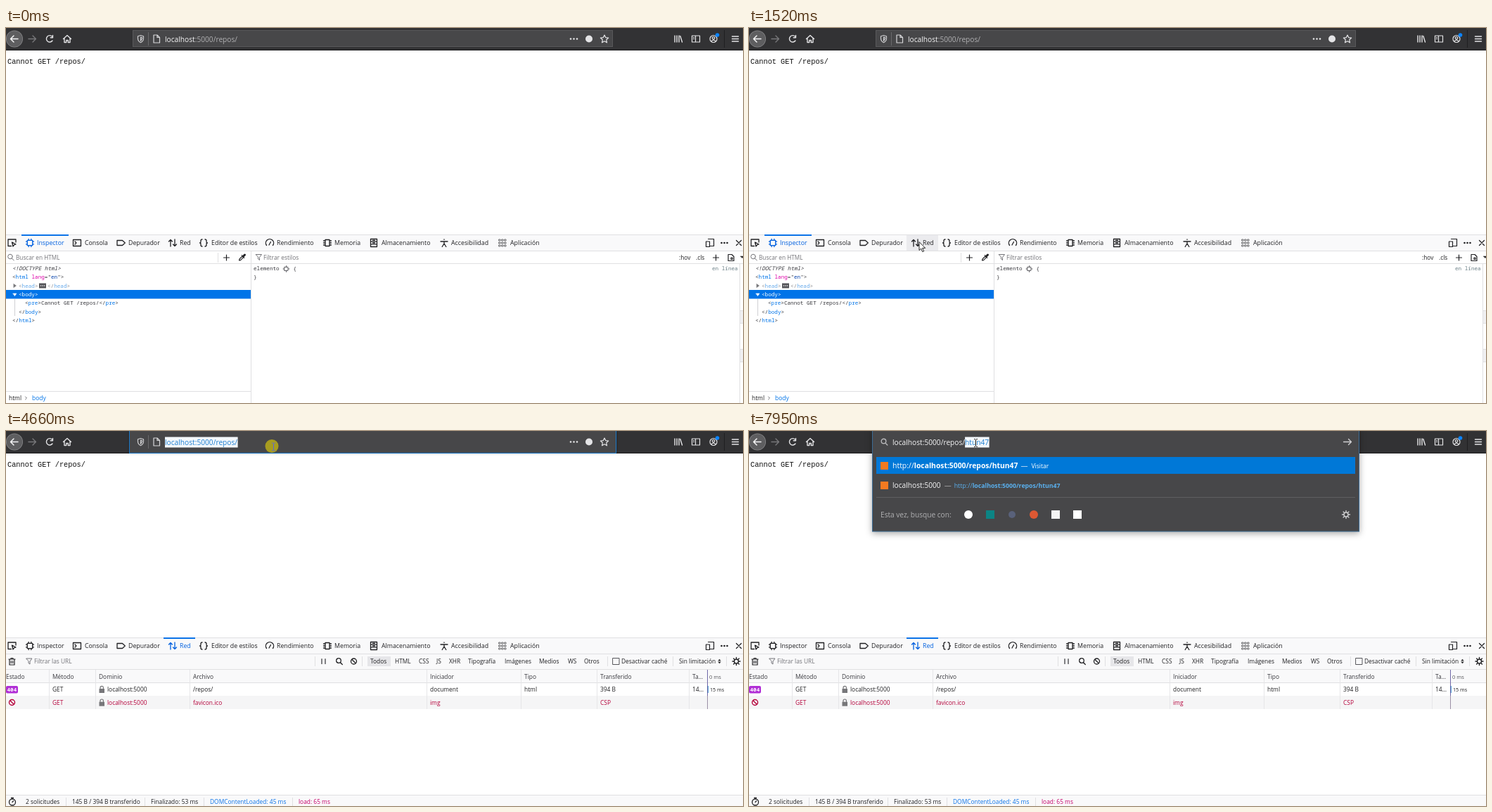
Animation, 1048 px wide and 534 px high, one loop 8000 ms. Source, as an HTML page with a canvas:

```html
<!DOCTYPE html>
<html lang="es">
<head>
<meta charset="utf-8">
<style>
html, body { margin: 0; width: 100%; height: 100%; overflow: hidden; background: #fff }
canvas { display: block }
</style>
</head>
<body>
<canvas id="stage" width="1048" height="534"></canvas>
<script>
const g = document.getElementById('stage').getContext('2d');
const LOOP = 8000, REPO = 'htun47', BASE = 'localhost:5000/repos/';
const SANS = '"Open Sans", sans-serif', MONO = '7.65px "Noto Sans Mono", monospace';
const INK = '#202023', GREY = '#737378', BLUE = '#0060df', LINE = '#e0e0e2', PALE = '#f9f9fa', RED = '#b5003a';
const LIGHT = '#e4e4e6', FIELD = '#474749';

// pointer path: time, x, y
const PATH = [[460, 405, 540], [880, 285, 375], [980, 254, 337], [1220, 247, 307], [1300, 246, 306],
  [1520, 242, 305], [2220, 242, 305], [2390, 244, 303], [2500, 247, 300], [2620, 253, 305], [2870, 251, 307],
  [2950, 240, 309], [3020, 246, 306], [3220, 246, 306], [3420, 248, 303], [3570, 248, 303], [4280, 380, 22],
  [6900, 380, 22], [7150, 343, 17], [7550, 303, 15], [7949, 303, 15], [7950, 322, 16.5]];

const rect = (x, y, w, h, c) => { g.fillStyle = c; g.fillRect(x, y, w, h); };
const disc = (x, y, r, c) => { g.fillStyle = c; g.beginPath(); g.arc(x, y, r, 0, 7); g.fill(); };
const sans = (size, weight = 400) => `${weight} ${size}px ${SANS}`;

// draws text/colour pairs one after another and returns the end
function run(x, y, font, ...pairs) {
  g.font = font;
  for (let i = 0; i < pairs.length; i += 2) {
    g.fillStyle = pairs[i + 1];
    g.fillText(pairs[i], x, y);
    x += g.measureText(pairs[i]).width;
  }
  return x;
}

function icon(x, y, d, c = INK, w = 1.2, fill) {
  const p = new Path2D(d);
  g.save();
  g.translate(x, y);
  g.lineJoin = g.lineCap = 'round';
  if (fill) { g.fillStyle = fill; g.fill(p); }
  g.strokeStyle = c; g.lineWidth = w;
  g.stroke(p);
  g.restore();
}

const LENS = 'M2.8-1a3.3 3.3 0 1 1-6.6 0a3.3 3.3 0 1 1 6.6 0M1.8 1.5l3 3';
const FUNNEL = 'M-4-4h8l-3 4v4l-2-1.5v-2.500z';
const PLUS = 'M-4 0h8M0-4v8';
const PAGE = 'M-4-5.500h5l3.500 3.500v7.500h-8.500zM1-5.500v3.500h3.500';
const CHIP = 'M-3.700-3.700h7.400v7.400h-7.400zM-1.800-5.500v1.500M1.800-5.500v1.500M-1.800 4v1.500M1.800 4v1.500M-5.500-1.800h1.500M-5.500 1.800h1.500M4-1.800h1.500M4 1.800h1.500';
const GEAR = 'M3 0a3 3 0 1 1-6 0a3 3 0 1 1 6 0M0-5.500v2M0 3.500v2M-5.500 0h2M3.500 0h2M-3.900-3.900l1.500 1.500M2.400 2.400l1.500 1.500M-3.900 3.900l1.500-1.500M2.400-2.400l1.500-1.500';
const BAN = 'M4 0a4 4 0 1 1-8 0a4 4 0 1 1 8 0M-2.800-2.800l5.600 5.600';
const CELLS = [-5, -1, 3].flatMap(x => [-5, -1, 3].map(y => `M${x} ${y}h2v2h-2z`)).join('');

const TABS = [
  ['Inspector', 44, 34, CHIP],
  ['Consola', 112, 101, 'M-5.500-4.500h11v9h-11zM-3-2l2 2-2 2'],
  ['Depurador', 174, 163.500, 'M-5.500-3.500h7.500l3.800 3.500-3.800 3.500h-7.500z'],
  ['Red', 247, 237, 'M-3 5v-9.500M-5.500-2l2.500-2.500 2.500 2.500M3-5v9.500M.5 2l2.500 2.500 2.500-2.500'],
  ['Editor de estilos', 292, 281, 'M-2-5q-2 0-2 2v1q0 2-1.500 2 1.500 0 1.500 2v1q0 2 2 2M2-5q2 0 2 2v1q0 2 1.500 2-1.500 0-1.500 2v1q0 2-2 2'],
  ['Rendimiento', 385, 375, 'M-4.500 3.500a5.600 5.600 0 1 1 9 0M-1 3l2.500-4.500'],
  ['Memoria', 467, 457, 'M-3-4.500h6v9h-6zM-5.500-3h2M-5.500 0h2M-5.500 3h2M3.500-3h2M3.500 0h2M3.500 3h2'],
  ['Almacenamiento', 534, 523, 'M-4.500-5.500h9v11h-9zM-4.500-1.800h9M-4.500 1.800h9M-1.500-3.600h3M-1.500 0h3'],
  ['Accesibilidad', 633, 623, 'M-5-2h10M0-2v3l-2.800 4.500M0 1l2.800 4.500M0-5v.4'],
  ['Aplicación', 717, 706, CELLS]
];

function pointer(t) {
  let i = PATH.findIndex(p => p[0] > t);
  if (i < 0) return PATH[PATH.length - 1].slice(1);
  if (i == 0) return PATH[0].slice(1);
  const [t0, x0, y0] = PATH[i - 1], [t1, x1, y1] = PATH[i], k = (t - t0) / (t1 - t0);
  return [x0 + (x1 - x0) * k, y0 + (y1 - y0) * k];
}

function toolbar() {
  rect(0, 0, 1048, 32, '#323234');
  rect(0, 31, 1048, 1, '#1a1a1c');
  disc(12, 15.500, 12, '#8a8a8c');
  disc(12, 15.500, 11.200, '#5e5e60');
  icon(12, 15.500, 'M5 0h-10M-1-4.500l-4.500 4.500 4.500 4.500', '#f4f4f5', 1.500);
  icon(37, 15.500, 'M-5 0h10M1-4.500l4.500 4.500-4.500 4.500', '#77777a', 1.400);
  icon(62, 15.500, 'M4 2.500a4.700 4.700 0 1 1-.5-6M4.500-5v3.200h-3.200', LIGHT, 1.400);
  icon(87, 15.500, 'M-5.500 0l5.500-5 5.500 5M-4-1v6h2.700v-3h2.600v3h2.700v-6', LIGHT, 1.400);
  icon(956, 15.500, 'M-5-4.500v9M-2-4.500v9M1-4.500v9M2.800-4l2.700 8.500', LIGHT, 1.400);
  icon(981, 15.500, 'M-5.500-4.500h11v9h-11zM-.5-4.500v9M-3.500-2h1M-3.500 0h1', LIGHT, 1.200);
  icon(1006, 15.500, 'M5 0a5 5 0 1 1-10 0a5 5 0 1 1 10 0M1.700-1.300a1.700 1.700 0 1 1-3.400 0a1.700 1.700 0 1 1 3.400 0M-3 3.200q3-3 6 0', LIGHT, 1.200);
  disc(1011.500, 10, 2.800, '#0a84ff');
  rect(1021, 3, 1, 25, '#1f1f21');
  icon(1037, 15.500, 'M-4.500-3.500h9M-4.500 0h9M-4.500 3.500h9', LIGHT, 1.400);
}

// selected stretch: white plate with blue letters
function selected(x, s, font) {
  g.font = font;
  rect(x, 8.500, g.measureText(s).width + .5, 15, '#f4f8fc');
  run(x, 20, font, s, '#1f7fd0');
}

function addressBar(t) {
  const font = sans(10.200), k = Math.min(1, Math.max(0, (t - 4290) / 70));
  const typing = t >= 5500;
  if (typing) return popup(t, font);
  g.save();
  if (k) { g.shadowColor = 'rgba(0,0,0,.3)'; g.shadowBlur = 3; }
  rect(180 - 5 * k, 3 - 3 * k, 683 + 10 * k, 24 + 8 * k, k ? '#1a78c8' : '#59595b');
  g.restore();
  rect(181 - 5 * k, 4 - 4 * k, 681 + 10 * k, 22 + 9 * k, FIELD);
  icon(191.500, 15.500, 'M0-5l4 1.200v3q0 4-4 6-4-2-4-6v-3zM0-2.500v5.500l2-3.500v-1.500z', '#cfcfd1', 1.200);
  rect(202, 6, 1, 19, '#69696b');
  icon(214, 15.500, PAGE, '#d8d8da', 1.200);
  for (const x of [803, 807.500, 812]) disc(x, 15.500, 1.300, LIGHT);
  disc(829, 15.500, 5, LIGHT);
  icon(851, 15.500, 'M0-5.500l1.700 3.600 4 .5-3 2.700.8 4-3.500-2-3.500 2 .8-4-3-2.700 4-.5z', LIGHT, 1.200);
  if (t >= 4430 && t < 4760) return selected(226, BASE, font);
  const end = run(226, 20, font, 'localhost', '#f6f6f7', BASE.slice(9), '#b1b1b3');
  if (t >= 4760 && t < 5350) rect(Math.round(end), 8, 1, 15, '#f6f6f7');
}

function popup(t, font) {
  const typed = REPO.slice(0, [5500, 5580, 5660, 5810, 5900, 6050].filter(v => t >= v).length);
  const rows = t < 5810 ? 1 : 2, shift = rows * 28, bottom = 87.500 + shift;
  g.save();
  g.shadowColor = 'rgba(0,0,0,.35)'; g.shadowBlur = 9; g.shadowOffsetY = 2;
  rect(175, -5, 693, bottom + 5, '#3c6c94');
  g.restore();
  rect(176, 0, 691, bottom - 1, FIELD);
  icon(192, 15.500, LENS, '#b8b8ba', 1.400);
  icon(851, 15.500, 'M-5.500 0h11M1.500-4l4 4-4 4', '#d0d0d2', 1.300);

  const count = t < 7150 ? 0 : Math.min(6, Math.round((t - 7150) / 400 * 6));
  const split = typed.length - count;
  const end = run(204, 20, font, BASE + typed.slice(0, split), '#f6f6f7');
  if (count) selected(end, typed.slice(split), font);
  else if (t < 6440) rect(Math.round(end), 8, 1, 15, '#f6f6f7');

  rect(181, 37, 681, 24, '#0078d7');
  rect(187, 44, 11, 11, '#f37a20');
  let x = run(204, 53, sans(10.500), 'http://', '#fff');
  x = run(x, 53, sans(10.350, 700), BASE + typed, '#fff');
  run(x + 4, 53, sans(10), '—', '#cfe4f7');
  run(x + 19, 53, sans(8.650), 'Visitar', '#fff');

  if (rows > 1) {
    rect(187, 72, 11, 11, '#f37a20');
    x = run(204, 81, sans(10.200), 'localhost:5000', '#f6f6f7');
    run(x + 5, 81, sans(10), '—', '#a8a8aa');
    x = run(x + 19, 81, sans(8.850), 'http://', '#5ab0ee');
    run(x, 81, sans(8.750, 700), BASE + (t < 6200 ? REPO.slice(0, 3) : REPO), '#5ab0ee');
  }
  rect(181, 38 + shift, 681, 1, '#5e5e60');
  run(187, 67 + shift, sans(10.150), 'Esta vez, busque con:', '#b1b1b3');
  const y = 63 + shift;
  disc(312, y, 6, '#fff');
  rect(337, y - 6, 12, 12, '#0c8484');
  disc(374, y, 5, '#59617a');
  disc(405, y, 6, '#de5833');
  rect(430, y - 6, 12, 12, '#f5f5f5');
  rect(461, y - 6, 12, 12, '#fff');
  icon(849, y, GEAR, '#d0d0d2', 1.400);
}

function tabBar(active, hover) {
  rect(0, 294, 1048, 24, PALE);
  rect(0, 294, 1048, 1, LINE);
  rect(0, 317, 1048, 1, LINE);
  if (hover) rect(224, 295, 45, 22, '#ebebee');
  if (active) rect(224, 294, 45, 2, '#0a72e8'); else rect(22, 294, 67, 2, '#0a72e8');
  icon(8.500, 306, 'M-1 4.500h-4.500v-9.500h11v4M0-1l1.500 6 1.400-2.200 2.600-.8z', INK, 1.300);
  TABS.forEach(([name, x, ix, d], i) => {
    const c = i == (active ? 3 : 0) ? BLUE : INK;
    icon(ix, 306, d, c, i == 9 ? .6 : 1.300);
    run(x, 309.300, sans(8.800), name, c);
  });
  icon(1001, 306, 'M-2.500-5.500h8v10h-5M-5.500-2h5v7.500h-5z', INK, 1.200);
  for (const x of [1017.500, 1021.500, 1025.500]) disc(x, 306, 1.300, INK);
  icon(1042, 306, 'M-3.500-3.500l7 7M3.500-3.500l-7 7', INK, 1.300);
}

function inspector(y) {
  const tag = '#0074e8', dark = '#38383d';
  const code = (x, yy, ...p) => run(x, yy, MONO, ...p);
  icon(6.500, 326.500, LENS, GREY, 1);
  run(14, 329.500, sans(8.250), 'Buscar en HTML', GREY);
  rect(301, 320, 1, 14, LINE);
  icon(313.500, 327, PLUS, INK, 1.200);
  icon(336, 326.500, 'M-4.500 4.500l.5-2 4-4 1.600 1.600-4 4zM-.8-2.800l3.600 3.600', INK, 1.100);
  icon(336, 326.500, 'M1.500-1.500l2-2', INK, 3);
  rect(0, 335, 1048, 1, LINE);

  const row = Math.floor((y - 336) / 12.350);
  if (row >= 0 && row < 7 && row != 3) rect(0, 336 + row * 12.350, 348, 12.350, '#eef8fd');
  rect(0, 373, 348, 12.500, '#0074e8');
  code(9, 345, '', dark);
  run(9, 345, 'italic ' + MONO, '<!DOCTYPE html>', dark);
  code(9, 357.300, '<', dark, 'html', tag, ' lang', '#dd00a9', '="', dark, 'en', '#003eaa', '">', dark);
  icon(12.500, 367, 'M-1.500-2.500l3.500 2.500-3.500 2.500z', '#77777a', .5, '#77777a');
  code(18, 369.700, '<', '#8a8a8e', 'head', '#66a9ea', '>', '#8a8a8e');
  rect(47, 363.500, 10, 7, '#55555a');
  for (const x of [49.500, 52, 54.500]) disc(x, 367, .8, '#fff');
  code(59, 369.700, '</', '#8a8a8e', 'head', '#66a9ea', '>', '#8a8a8e');
  icon(12.500, 379.500, 'M-2.500-1.500h5l-2.500 3.500z', '#fff', .5, '#fff');
  code(18, 382, '<body>', '#fff');
  code(27, 394.400, '<', dark, 'pre', tag, '>Cannot GET /repos/</', dark, 'pre', tag, '>', dark);
  rect(12, 386, 1, 24, '#d0d0d4');
  code(18, 406.700, '</', dark, 'body', tag, '>', dark);
  code(9, 419, '</', dark, 'html', tag, '>', dark);

  rect(0, 517, 348, 1, LINE);
  run(4, 530, sans(8.400), 'html', INK);
  icon(28.500, 527, 'M-1-2l2 2-2 2', GREY, 1);
  run(37, 530, sans(8.500), 'body', tag);
  rect(348, 318, 1, 216, LINE);

  icon(359.500, 326.500, FUNNEL, GREY, 1);
  run(366, 329.500, sans(8.450), 'Filtrar estilos', GREY);
  run(957, 329.500, sans(8.300), ':hov', INK);
  run(981, 329.500, sans(8.300), '.cls', INK);
  icon(1009.500, 327, PLUS, INK, 1.200);
  icon(1031, 327, 'M-4-4.500h5l3 3v6h-8zM0 0h2v2.500h-2z', INK, 1.200);
  icon(1046.500, 326, 'M-2-1h5l-2.500 2.500z', INK, .5, INK);
  rect(1043, 336, 1, 198, LINE);
  for (const yy of [402, 457]) {
    rect(1044, yy, 4, 19, '#f0f0f2');
    rect(1044, yy, 4, 1, LINE);
    rect(1044, yy + 18, 4, 1, LINE);
  }
  code(352, 345, 'elemento', dark);
  icon(398.500, 343, 'M-2.500-2.500h5v5h-5zM0-4.500v2M0 2.500v2M-4.500 0h2M2.500 0h2', '#55555a', .9);
  code(408.500, 345, '{', dark);
  code(352, 357.300, '}', dark);
  code(1004, 345, 'en línea', '#6a7f86');
}

function network() {
  const put = (x, y, s, c = INK, size = 8.400) => run(x, y, sans(size), s, c);
  rect(0, 318, 1048, 40, PALE);
  rect(0, 339, 1048, 1, LINE);
  rect(0, 358, 1048, 1, LINE);
  rect(0, 377, 1048, 19, '#f5f5f6');
  icon(8.500, 328, 'M-4.500-3h9M-1.500-3v-1.500h3v1.500M-3.500-3v8h7v-8M-1.200-.5v3M1.200-.5v3', INK, 1.200);
  icon(33, 328, FUNNEL, GREY, 1);
  put(40, 331, 'Filtrar las URL', GREY);
  for (const x of [439, 506, 855, 948, 1024]) rect(x, 321, 1, 14, LINE);
  icon(451.500, 328, 'M-2.500-3.500v7M2.500-3.500v7', INK, 1.100);
  icon(473.500, 328, LENS, INK, 1.300);
  icon(494.500, 328, BAN, INK, 1.300);
  rect(514, 321, 33, 14, '#e6e6e9');
  [['Todos', 518], ['HTML', 553], ['CSS', 587], ['JS', 612], ['XHR', 630], ['Tipografía', 657], ['Imágenes', 709],
    ['Medios', 758], ['WS', 799], ['Otros', 822], ['Desactivar caché', 875], ['Sin limitación', 957]]
    .forEach(([s, x]) => put(x, 331, s));
  icon(867.500, 328, 'M-4.500-4.500h9v9h-9z', '#55555a', 1);
  icon(1014.500, 328, 'M-1.500-1l1.500-2 1.500 2zM-1.500 1l1.500 2 1.500-2z', INK, .5, INK);
  icon(1038.500, 328, GEAR, INK, 1.400);

  for (const x of [61, 127, 261, 598, 732, 840, 971]) rect(x, 340, 1, 56, '#e6e6e8');
  [['Estado', 0], ['Método', 66], ['Dominio', 132], ['Archivo', 266], ['Iniciador', 603], ['Tipo', 737],
    ['Transferido', 845], ['Ta…', 976]].forEach(([s, x]) => put(x, 352.500, s, '#38383d'));
  rect(997, 340, 1, 37, '#6f68a8');
  rect(997, 377, 1, 19, '#9a8fa5');
  put(1000, 352.500, '0 ms', '#55555a', 7.500);

  g.fillStyle = '#b12fd6';
  g.beginPath(); g.roundRect(0, 363, 17, 10.500, 2); g.fill();
  run(1.500, 371, '700 7.650px "Noto Sans Mono", monospace', '404', '#fff');
  icon(8.500, 386.500, BAN, RED, 1.400);
  [[371, INK, '/repos/', 'document'], [389.700, RED, 'favicon.ico', 'img']].forEach(([y, c, file, by]) => {
    put(66, y, 'GET', c);
    rect(132.500, y - 4, 7.500, 6, '#77777a');
    icon(136.200, y - 4, 'M-2.200 0v-1.500a2.200 2.200 0 0 1 4.400 0v1.500', '#77777a', 1.200);
    put(144, y, 'localhost:5000', c);
    put(266, y, file, c);
    put(603, y, by, c);
  });
  put(737, 371, 'html');
  put(845, 371, '394 B');
  put(976, 371, '14…');
  rect(998, 363, 1, 10, '#5fa8d8');
  put(1001, 370.500, '15 ms', INK, 7.200);
  put(845, 389.700, 'CSP', RED);

  rect(0, 518, 1048, 16, PALE);
  rect(0, 518, 1048, 1, LINE);
  icon(9, 528, 'M4.500 .5a4.500 4.500 0 1 1-9 0a4.500 4.500 0 1 1 9 0M0 .5l1.500-1.800M-1.500-5.500h3', INK, 1.300);
  for (const x of [85, 197, 281, 407]) rect(x, 522, 1, 12, LINE);
  put(28, 531, '2 solicitudes');
  put(94, 531, '145 B / 394 B transferido');
  put(206, 531, 'Finalizado: 53 ms');
  put(290, 531, 'DOMContentLoaded: 45 ms', '#0a72e8');
  put(416, 531, 'load: 65 ms', '#c4006a');
}

function drawPointer(t, x, y) {
  if (t >= 1680 && t < 1830) disc(x - 1, y, 9.500, 'rgba(230,215,30,.75)');
  if (t >= 4430 && t < 4780) disc(x - 2, y - .5, 9.500, '#a79c20');
  if (y > 30) {
    icon(x, y, 'M0 0v11.500l2.700-2.400 2.100 4.600 1.900-.9-2.100-4.400h3.700z', '#111', .9, '#fff');
    return;
  }
  g.save();
  g.globalCompositeOperation = 'difference';
  icon(x + .5, y + .5, 'M-2-5.500q2 0 2 1 0-1 2-1M0-4.500v9M-2 5.500q2 0 2-1 0 1 2 1', '#fff', 1);
  g.restore();
}

function frame(now) {
  const t = now % LOOP, [x, y] = pointer(t), red = t >= 1750;
  rect(0, 0, 1048, 534, '#fff');
  run(2, 51, '10.280px "Liberation Mono", monospace', 'Cannot GET /repos/', '#111');
  tabBar(red, y > 294 && y < 317);
  if (red) network(); else inspector(y);
  toolbar();
  addressBar(t);
  drawPointer(t, x, y);
  requestAnimationFrame(frame);
}
requestAnimationFrame(frame);
</script>
</body>
</html>
```
